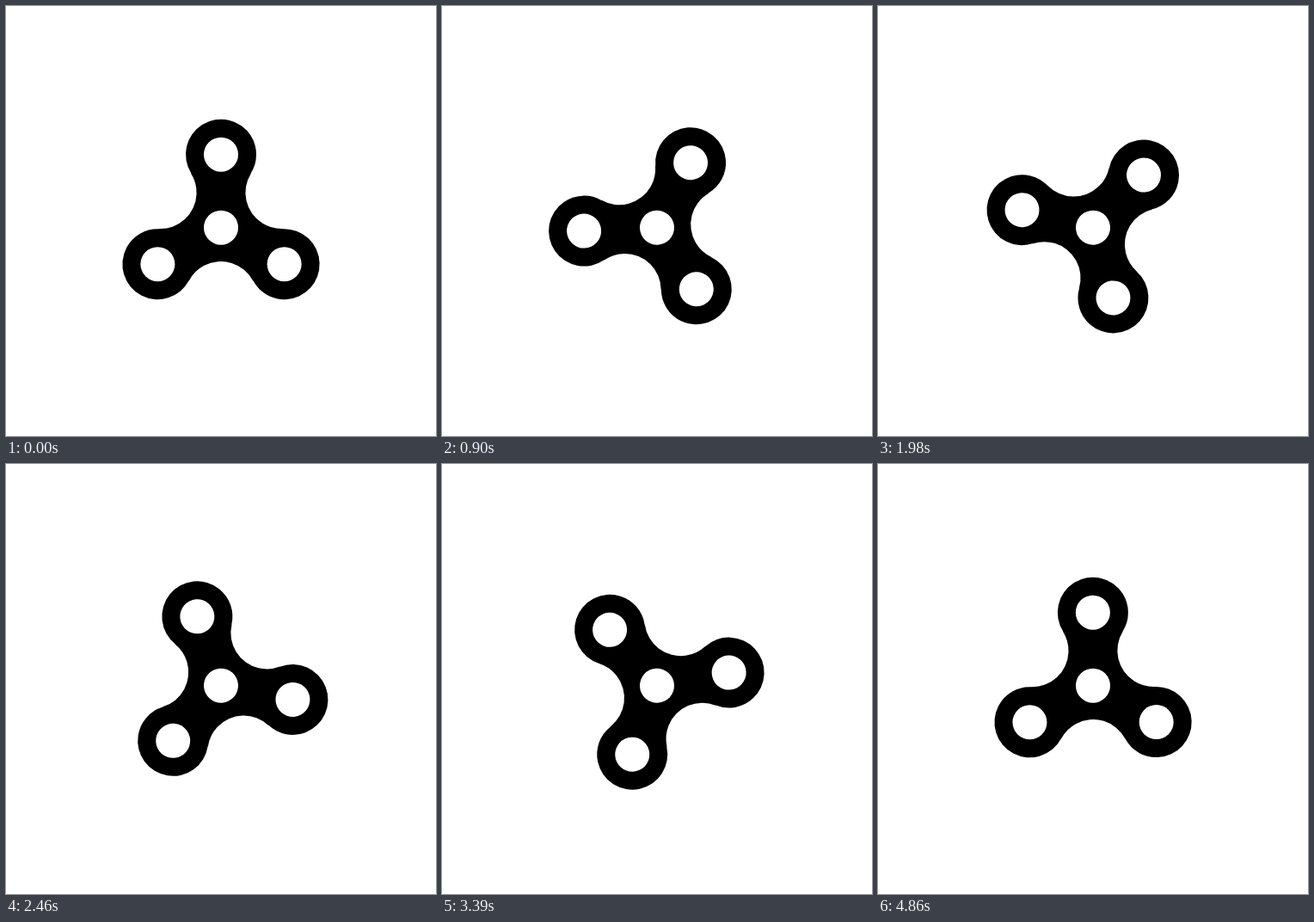
An HTML page with a canvas for the animation above (5.82 s loop, 500 by 500 pixels).

```html
<!DOCTYPE html>
<html lang="en">
<head>
<meta charset="utf-8">
<title>Spinner</title>
<style>
  html, body { margin: 0; width: 100%; height: 100%; overflow: hidden; background: #fff; }
  canvas { display: block; }
</style>
</head>
<body>
<canvas id="stage" width="500" height="500"></canvas>
<script>
const ctx = document.getElementById('stage').getContext('2d');
const LOOP = 5820, STEP = 30, START = 25, SPIN = 4874, TURNS = 7;
const ARM = 85, LOBE = 41, HOLE = 20;      // arm length, lobe and hole radii
const NOTCH = 81.3, NOTCH_R = 42;          // concave arcs between the arms
const rad = deg => deg * Math.PI / 180;

const bezier = (p1, p2, u) => 3 * u * (1 - u) ** 2 * p1 + 3 * u * u * (1 - u) * p2 + u ** 3;

// cubic-bezier(.25, .1, .25, 1), solved by bisection
function ease(x) {
  let lo = 0, hi = 1;
  for (let i = 0; i < 40; i++) {
    const mid = (lo + hi) / 2;
    if (bezier(.25, .25, mid) < x) lo = mid; else hi = mid;
  }
  return bezier(.1, 1, lo);
}

function arc(dist, dir, r, from, to, ccw) {
  const a = rad(dir);
  ctx.arc(dist * Math.cos(a), dist * Math.sin(a), r, rad(dir + from), rad(dir + to), ccw);
}

function hole(dist, dir) {
  ctx.beginPath();
  arc(dist, dir, HOLE, 0, 360);
  ctx.fill();
}

function draw(now) {
  const t = Math.floor((now % LOOP) / STEP + 1e-3) * STEP;
  const progress = Math.min(1, Math.max(0, (t - START) / SPIN));
  const arms = [-90, 30, 150];

  ctx.setTransform(1, 0, 0, 1, 0, 0);
  ctx.fillStyle = '#fff';
  ctx.fillRect(0, 0, 500, 500);
  ctx.translate(250, 257.7);
  ctx.rotate(rad(360 * TURNS * ease(progress)));

  ctx.fillStyle = '#000';
  ctx.beginPath();
  for (const dir of arms) {
    arc(ARM, dir, LOBE, -122.2, 122.2, false);
    arc(NOTCH, dir + 60, NOTCH_R, 242.2, 117.8, true);
  }
  ctx.fill();

  ctx.fillStyle = '#fff';
  hole(0, 0);
  for (const dir of arms) hole(ARM, dir);
}

function tick() {
  draw(performance.now());
  requestAnimationFrame(tick);
}
tick();
</script>
</body>
</html>
```
